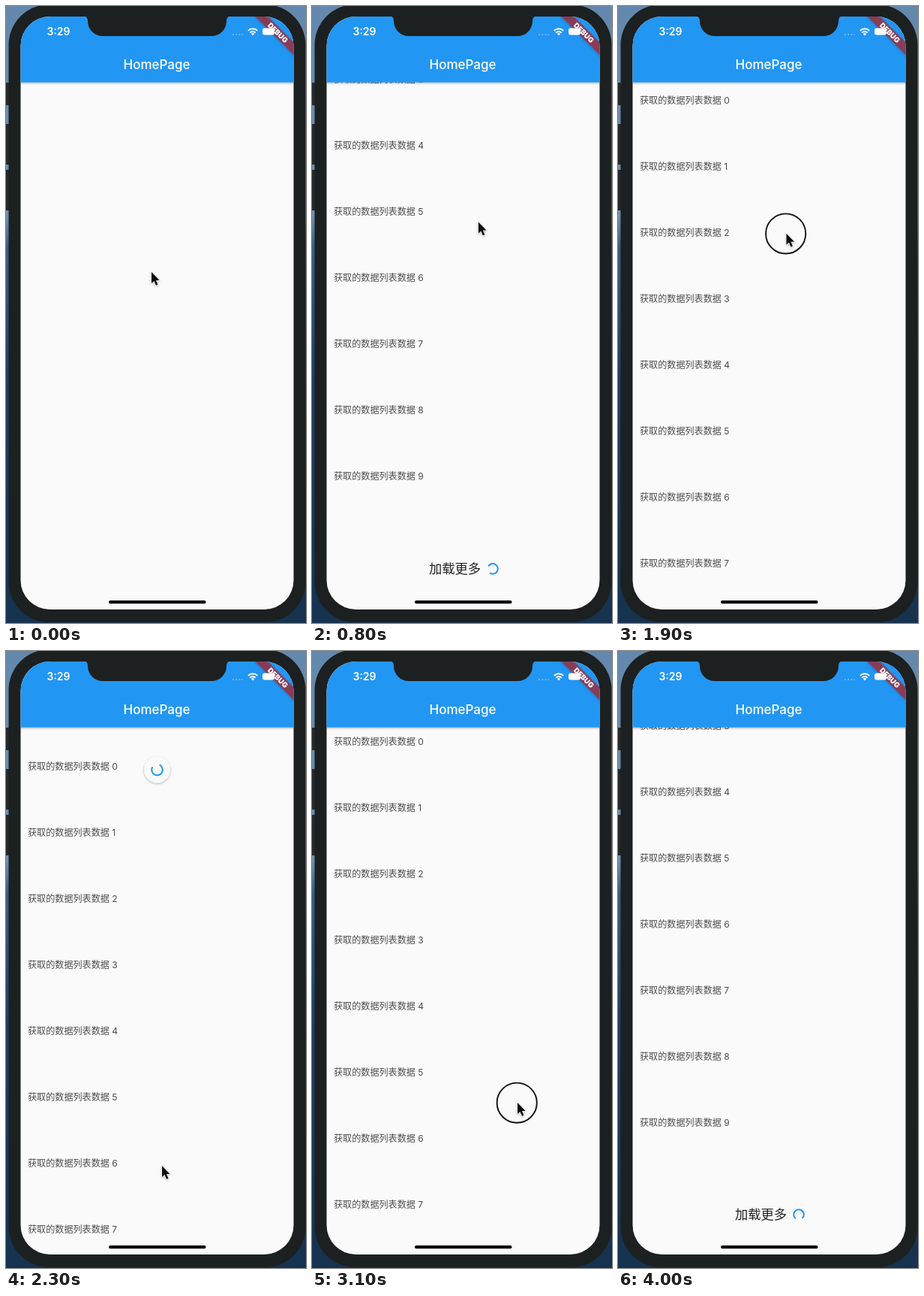
Write an HTML page that moves like this. It is 400 by 821 pixels and loops after 4100 ms.

```html
<!DOCTYPE html>
<html lang="zh-CN">
<head>
<meta charset="utf-8">
<title>HomePage</title>
<style>
html, body { margin: 0; width: 100%; height: 100%; overflow: hidden; background: #1c2020 }
svg { display: block; width: 400px; height: 821px; font-family: Inter, "Noto Sans CJK SC", "Noto Sans CJK", sans-serif }
.row { font-size: 12.1px; fill: #4c4c4c }
.arc { fill: none; stroke: #2196f3; stroke-width: 2 }
</style>
</head>
<body>
<svg viewBox="0 0 400 821">
  <defs>
    <linearGradient id="desk" x2="0" y2="1">
      <stop stop-color="#6488ad"/>
      <stop offset=".34" stop-color="#6f90ae"/>
      <stop offset=".39" stop-color="#3b5d84"/>
      <stop offset=".6" stop-color="#213c62"/>
      <stop offset="1" stop-color="#15324f"/>
    </linearGradient>
    <clipPath id="screen"><rect x="19.5" y="14" width="364" height="789" rx="39"/></clipPath>
    <filter id="soft" x="-50%" y="-50%" width="200%" height="200%">
      <feDropShadow dx="0" dy="1" stdDeviation="1.5" flood-opacity=".32"/>
    </filter>
  </defs>

  <rect width="400" height="821" fill="url(#desk)"/>
  <path d="M0 102h4v30H0zM0 157h4v54H0zM0 218h4v54H0z" fill="#25292b"/>
  <rect x="3.5" y="-2" width="396" height="822" rx="54" fill="#1c2020"/>

  <g clip-path="url(#screen)">
    <rect x="19" y="14" width="366" height="789" fill="#fafafa"/>
    <g id="list">
      <g id="rows"></g>
      <g id="footer">
        <text x="156" y="6" font-size="17.3" fill="#222">加载更多</text>
        <path class="arc" id="moreArc" transform="translate(241 0)"/>
      </g>
    </g>
    <g id="refresh">
      <circle r="17.5" fill="#fafafa" filter="url(#soft)"/>
      <path class="arc" id="refreshArc"/>
    </g>
    <rect x="10" y="4" width="384" height="97.6" fill="#2196f3" filter="url(#soft)"/>
    <text x="201" y="83.5" text-anchor="middle" font-size="17" font-weight="500" fill="#fff">HomePage</text>
    <text x="54.5" y="39" font-size="14" font-weight="600" fill="#fff">3:29</text>
    <g transform="translate(384 14) rotate(45)">
      <rect x="-60" y="24.5" width="120" height="12" fill="#b71c1c" fill-opacity=".66" filter="url(#soft)"/>
      <text y="34" text-anchor="middle" font-size="9.6" font-weight="900" fill="#fff">DEBUG</text>
    </g>
    <g fill="#fff">
      <path d="M302 38h14" stroke="#fff" stroke-opacity=".3" stroke-width="2" stroke-dasharray="2 2.2"/>
      <path d="M322.8 32.8a8.8 8.8 0 0 1 12.4 0M325.3 35.6a5.2 5.2 0 0 1 7.4 0" fill="none" stroke="#fff" stroke-width="1.9"/>
      <path d="M329 39.5l-2.2-2.4a3.2 3.2 0 0 1 4.4 0z"/>
      <rect x="342" y="29.5" width="16" height="9" rx="2.4"/>
    </g>
  </g>

  <path d="M102 13q7 0 7 7a20 20 0 0 0 20 20H274a20 20 0 0 0 20-20q0-7 7-7z" fill="#1c2020"/>
  <rect x="137" y="791" width="129.5" height="4.3" rx="2.1" fill="#0c0c0c"/>

  <g id="pointer">
    <circle id="touch" cx="-.8" cy=".2" r="26.6" fill="none" stroke="#111" stroke-width="1.9"/>
    <path d="M0 0V15.8L3.6 12.5 6.3 18.8 9 17.6 6.3 11.5H11.2Z" transform="scale(.95)" fill="#111" stroke="#fff"
      paint-order="stroke" filter="url(#soft)"/>
  </g>
</svg>

<script>
const LOOP = 4100, STEP = 100, ROW = 88, FIRST = 120;
const LOADED = 300, MORE = 1300, PULL = 1890, REFRESHED = 2700;
const SETTLE = 65;  // ms, decay of the scroll after release

// Each drag pulls the list along; after release the list settles at rest.
const drags = [
  { start: 400, end: 600, from: [220, 575], to: [222, 286], rest: 286 },
  { start: MORE, end: 1400, from: [205, 520], to: [200, 296], rest: 510 },
  { start: 1500, end: 1600, from: [200, 300], to: [201, 556], rest: 0 },
  { start: PULL, end: 2200, from: [225, 290], to: [208, 685], rest: 0, grip: 0.4 },
  { start: 3100, end: 3300, from: [274, 601], to: [276, 316], rest: 285 }
];
const ENTER = { end: 0, to: [194, 354], rest: 0 };
const LEAVE = { start: 4000, from: [420, 460] };

const $ = id => document.getElementById(id);
const set = (id, name, value) => $(id).setAttribute(name, value);
const move = (id, x, y, extra = "") => set(id, "transform", `translate(${x} ${y}) ${extra}`);
const show = (id, on) => set(id, "visibility", on ? "visible" : "hidden");
const progress = (t, start, end) => Math.min(1, Math.max(0, (t - start) / (end - start)));
const mix = (a, b, p) => a.map((v, i) => v + (b[i] - v) * p);

$("rows").innerHTML = Array.from({ length: 20 }, (_, i) =>
  `<text class="row" x="29" y="${FIRST + i * ROW + 4.5}">${i < 10 ? "获取的数据列表数据" : "这是新的数据"} ${i % 10}</text>`
).join("");
const rows = [...$("rows").children];

function pose(t) {
  let last = ENTER, scroll = 0;
  for (const drag of drags) {
    if (t < drag.start) break;
    const point = mix(drag.from, drag.to, progress(t, drag.start, drag.end));
    scroll = last.rest + (drag.from[1] - point[1]) * (drag.grip ?? 1);
    if (t <= drag.end) return { point, scroll, touching: true };
    scroll = drag.rest + (scroll - drag.rest) * Math.exp((drag.end - t) / SETTLE);
    last = drag;
  }
  const next = drags.find(drag => drag.start > t) ?? LEAVE;
  const point = mix(last.to, next.from, progress(t, last.end, next.start) ** 4);
  return { point, scroll, touching: false };
}

function arc(radius, degrees, sweep = 275) {
  const point = d => [Math.cos(d * Math.PI / 180) * radius, Math.sin(d * Math.PI / 180) * radius].map(v => v.toFixed(2));
  return `M${point(degrees)}A${radius} ${radius} 0 1 1 ${point(degrees + sweep)}`;
}

function draw(t) {
  const { point, scroll, touching } = pose(t);
  const count = t >= MORE && t < REFRESHED ? 20 : 10;
  const spin = 210 + (t - 800) * 0.5375;

  show("list", t >= LOADED);
  move("list", 0, -scroll);
  rows.forEach((row, i) => row.style.display = i < count ? "" : "none");
  move("footer", 0, FIRST + count * ROW + 35);
  set("moreArc", "d", arc(6.8, spin));

  const drop = 1 - (1 - progress(t, PULL, 2200)) ** 2;
  const shrink = 1 - progress(t, REFRESHED, REFRESHED + 200);
  show("refresh", t > PULL && shrink > 0);
  move("refresh", 201.5, 76 + 82 * drop, `scale(${shrink})`);
  set("refreshArc", "d", arc(7.3, spin));

  move("pointer", ...point);
  show("touch", touching);
}

function tick(now) {
  draw(Math.floor(now % LOOP / STEP) * STEP);
  requestAnimationFrame(tick);
}
requestAnimationFrame(tick);
</script>
</body>
</html>
```
